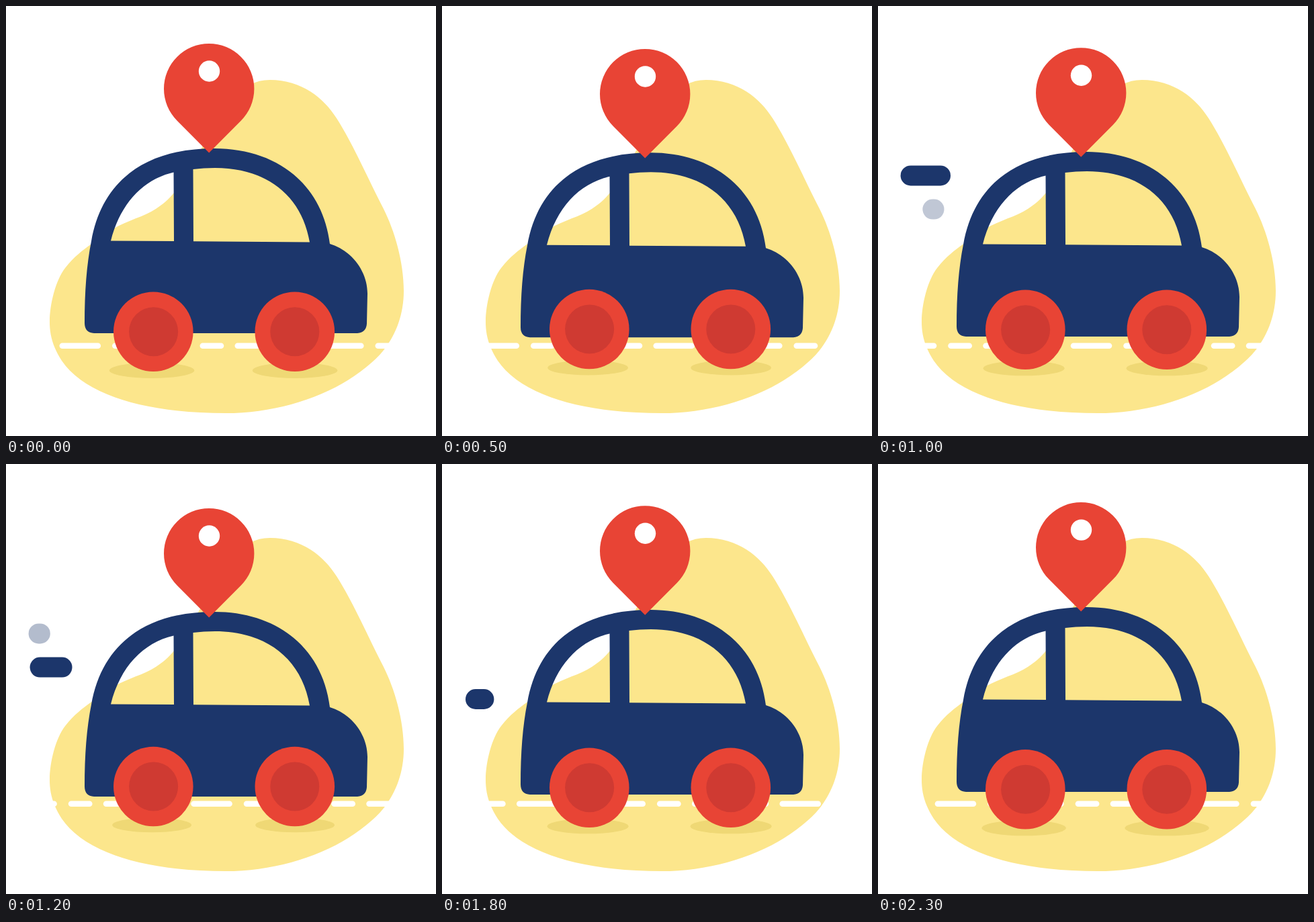
An HTML page that plays this animation: 640 px wide and 640 px high, repeating every 2.4 s.

```html
<!DOCTYPE html>
<html lang="en">
<head>
<meta charset="utf-8">
<title>Car ride</title>
<style>
  html, body { margin: 0; width: 100%; height: 100%; overflow: hidden; background: #fff; }
  svg { display: block; width: 100%; height: 100%; }
</style>
</head>
<body>
<svg viewBox="0 0 640 640">
  <path fill="#fce68c" d="M393 110C440 110 473 137 492 167C517 206 541 262 562 302C578 334 592 380 592 424C592 470 572 507 545 530C493 577 410 606 327 606C215 606 120 582 83 528C68 505 65 486 65 470C65 444 74 408 88 390C101 373 115 363 126 355C142 343 151 336 168 327C190 316 213 311 230 297C252 282 270 250 288 217C325 150 348 110 393 110Z"/>
  <g id="road" stroke="#fff" stroke-width="8.6" stroke-linecap="round"></g>
  <g id="shadows" fill="#efd875">
    <ellipse cx="217.1"/>
    <ellipse cx="430.1"/>
  </g>
  <g id="streaks" stroke="#1c366b" stroke-width="30" stroke-linecap="round"></g>
  <path id="body" fill="#1c366b" fill-rule="evenodd" d="M131 487Q117 486 117 472C117 425 120 385 127 350C143 258 210 212 310 212C404 212 471 266 482 354C515 364 538 395 538 428L537 473Q536 486 523 487ZM156 349.5L250 350L249.500 247.500C204 258 170 294 156 349.5ZM278.500 243L279 350.300L452 351.500C440 282 388 241 311 241Q294 241 278.500 243Z"/>
  <g id="wheels">
    <g fill="#e84435"><circle cx="219.3" cy="484.8" r="59.3"/><circle cx="429.8" cy="484.8" r="59.3"/></g>
    <g fill="#cf3a32"><circle cx="219.6" cy="484.8" r="36.5"/><circle cx="429.8" cy="484.8" r="36.5"/></g>
  </g>
  <g id="pin">
    <path fill="#e84435" d="M302.200 218.500L254.700 170.700A67.200 67.200 0 1 1 349.700 170.700Z"/>
    <circle cx="302.5" cy="97" r="15.7" fill="#fff"/>
  </g>
</svg>
<script>
const LOOP = 2400, STEP = 100, BOUNCE = 400, DASH_PERIOD = 130.5;
const $ = id => document.getElementById(id);
const clamp = u => Math.min(1, Math.max(0, u));
const smooth = u => { u = clamp(u); return u * u * (3 - 2 * u); };
const ramp = (t, start, length) => clamp((t - start) / length);
const mix = (a, b, u) => a + (b - a) * u;

function addLine(parent, y) {
  const line = document.createElementNS("http://www.w3.org/2000/svg", "line");
  line.setAttribute("y1", y);
  line.setAttribute("y2", y);
  parent.append(line);
  return line;
}

function span(line, left, right) {
  line.setAttribute("x1", left);
  line.setAttribute("x2", right);
}

// One long and one short dash per road period
for (let i = 0; i < 7; i++) {
  const x = 79.5 + (i - 1) * DASH_PERIOD;
  span(addLine($("road"), 505.7), x + 4.3, x + 57.3);
  span(addLine($("road"), 505.7), x + 82.8, x + 110);
}

const streaks = [
  { y: 252.4, left: 48.6, right: 98.5, start: 593 },
  { y: 302.6, left: 50, right: 83.5, start: 960 },
  { y: 350, left: 50, right: 66, start: 1363 }
].map(s => ({ ...s, line: addLine($("streaks"), s.y) }));

// 0 = body up, 1 = body pressed down
function squash(t) {
  const phase = (t / BOUNCE) % 2;
  const u = phase % 1;
  const eased = smooth(u + 0.085 * Math.sin(Math.PI * u) ** 2);
  return phase < 1 ? eased : 1 - eased;
}

function draw(t) {
  const p = squash(t);
  const pulse = 1 + 0.1 * (smooth(ramp(t, 600, 167)) - smooth(ramp(t, 767, 167)));
  const turn = t / LOOP;
  const roll = -DASH_PERIOD * turn + 1.2 * Math.sin(2 * Math.PI * turn);

  $("road").setAttribute("transform", `translate(${roll} 0)`);
  $("body").setAttribute("transform", `translate(0 ${8 * p})`);
  $("wheels").setAttribute("transform", `translate(0 ${-4.8 * p})`);
  $("pin").setAttribute("transform",
    `translate(302.2 ${137.2 + 10 * p}) scale(${pulse}) translate(-302.2 -137.2)`);

  for (const shadow of $("shadows").children) {
    shadow.setAttribute("cy", 542.4 - 5 * p);
    shadow.setAttribute("rx", 63.2 - 4.3 * p);
    shadow.setAttribute("ry", 11.6 - 0.8 * p);
  }

  for (const { line, left, right, start } of streaks) {
    const age = t - start;
    const head = mix(right, left, smooth(ramp(age, 0, 260)));
    const tail = mix(right, left, smooth(ramp(age, 345, 300)));
    span(line, head, tail + 0.01);
    line.setAttribute("opacity", ramp(age, 0, 145) * (1 - ramp(age, 520, 130)));
  }
}

const begin = performance.now();
function tick() {
  const t = (performance.now() - begin) % LOOP;
  draw(Math.floor(t / STEP) * STEP);
  requestAnimationFrame(tick);
}
tick();
</script>
</body>
</html>
```
